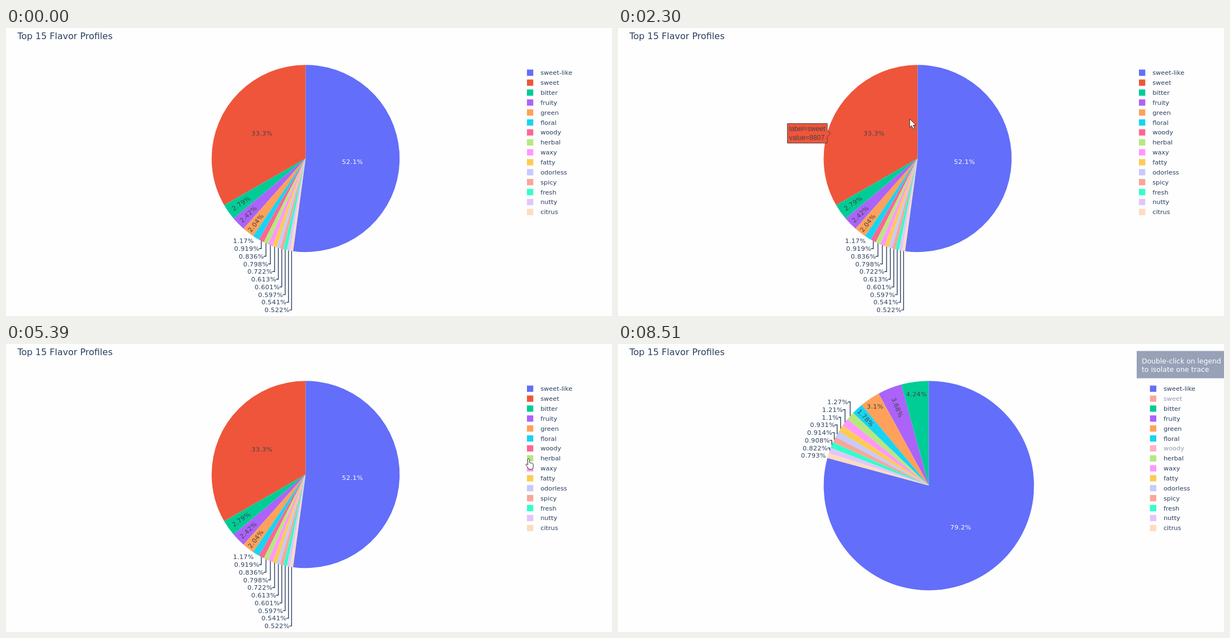
Write an HTML page with a canvas that moves like this. It is 1083 px wide and 517 px high and loops after 9.63 s.

```html
<!DOCTYPE html>
<html lang="en">
<head>
<meta charset="utf-8">
<title>Top 15 Flavor Profiles</title>
<style>
html, body { margin: 0; width: 100%; height: 100%; overflow: hidden; background: #fefefe; }
canvas { display: block; }
</style>
</head>
<body>
<canvas id="stage" width="1083" height="517"></canvas>
<script>
const LOOP = 9630;
const INK = '#2a3f5f';
const SANS = '"DejaVu Sans", Verdana, sans-serif';
const LABEL_FONT = '11.3px ' + SANS;
const LINE_HEIGHT = 13.77;
const HOVER_LAG = 50;
const ctx = document.getElementById('stage').getContext('2d');

const flavors = [
  ['sweet-like', 13785, '#636efa'], ['sweet', 8807, '#ef553b'],
  ['bitter', 738, '#00cc96'], ['fruity', 640, '#ab63fa'],
  ['green', 540, '#ffa15a'], ['floral', 309, '#19d3f3'],
  ['woody', 243, '#ff6692'], ['herbal', 221, '#b6e880'],
  ['waxy', 211, '#ff97ff'], ['fatty', 191, '#fecb52'],
  ['odorless', 162, '#c6cafd'], ['spicy', 159, '#f7a799'],
  ['fresh', 158, '#33ffc9'], ['nutty', 143, '#e0c6fd'],
  ['citrus', 138, '#ffdbc0']
].map(([name, value, color]) => ({ name, value, color }));

// bare: the outside label that needs no leader line
const layouts = [
  { start: 0, cx: 535.5, cy: 234.2, r: 168, legendX: 931, labelY: 382.2, bare: 'floral', hidden: [] },
  { start: 6630, cx: 535.5, cy: 240.2, r: 174, legendX: 933, labelY: 395.7, bare: 'floral', hidden: ['woody'] },
  { start: 8160, cx: 555.5, cy: 254.2, r: 188, legendX: 950.7, labelY: 104, bare: 'citrus', hidden: ['woody', 'sweet'] }
];

// Pointer route: time, x, y
const route = [
  [150, 1005, 520], [420, 705, 386], [680, 705, 386], [1000, 575, 338],
  [1190, 513, 337], [1290, 498, 337], [1450, 462, 318], [1620, 436, 293],
  [1650, 436, 293], [1900, 421, 229], [2100, 447, 172], [2300, 521, 163],
  [2420, 553, 183], [2600, 566, 204], [2630, 566, 204], [3000, 588, 270],
  [3300, 560, 330], [3450, 526, 337], [3560, 505, 335], [3640, 482.5, 323.5],
  [3690, 482, 323], [3800, 478.5, 321], [4550, 478.5, 321], [4910, 864, 238],
  [5180, 864, 238], [5390, 934, 206], [5870, 962.5, 190], [6080, 962.5, 190],
  [6200, 962.5, 188], [6630, 962.5, 188], [7540, 963.5, 98], [8390, 963.5, 98],
  [8510, 998, 450]
];
const clicks = [[4010, 4140], [6200, 6390], [7630, 7780]];

const arrow = new Path2D('M0 0V15.5L3.6 12.2 6.4 18.4 9 17.3 6.3 11.3H11Z');
const hand = new Path2D('M-1.6 1.5a1.6 1.6 0 0 1 3.2 0V7l5 1.2q1.6.5 1.6 2.2V14q0 2-1.4 5H0' +
  'q-1-3-4.6-7.4-1-1.6.4-2.2 1.2-.4 2.6 1.8Z');

function pointerAt(t) {
  const i = route.findIndex(p => p[0] > t);
  if (i < 1) return null;
  const [t0, x0, y0] = route[i - 1], [t1, x1, y1] = route[i];
  const k = (t - t0) / (t1 - t0);
  return { x: x0 + (x1 - x0) * k, y: y0 + (y1 - y0) * k };
}

// Angles run counterclockwise from twelve o'clock; the largest slice comes last.
function buildSlices(layout) {
  const shown = flavors.filter(f => !layout.hidden.includes(f.name));
  const total = shown.reduce((sum, f) => sum + f.value, 0);
  let end = 0;
  return [...shown.slice(1), shown[0]].map(f => {
    const share = f.value / total, start = end, half = Math.PI * share;
    end = start + 2 * half;
    const mid = start + half;
    const inscribed = share > 0.5 ? 0.5 : 1 / (1 + 1 / Math.sin(half));
    const at = k => ({
      x: layout.cx - Math.sin(mid) * layout.r * k,
      y: layout.cy - Math.cos(mid) * layout.r * k
    });
    return { ...f, start, end, mid, half, inscribed, at,
      ink: f.name === 'sweet-like' ? '#fff' : '#444',
      percent: Number((share * 100).toPrecision(3)) + '%' };
  });
}
layouts.forEach(layout => { layout.slices = buildSlices(layout); });

function write(text, x, y, color = INK, align = 'left') {
  ctx.fillStyle = color;
  ctx.textAlign = align;
  ctx.fillText(text, x, y);
}

function drawOutsideLabel(slice, y, withLine) {
  const rim = slice.at(1);
  write(slice.percent, rim.x - 3.6, y + 4.1, INK, 'right');
  if (!withLine) return;
  ctx.beginPath();
  ctx.moveTo(rim.x, rim.y);
  ctx.lineTo(rim.x, y);
  ctx.lineTo(rim.x - 4, y);
  ctx.strokeStyle = INK;
  ctx.lineWidth = 1.4;
  ctx.stroke();
}

function drawPie(layout) {
  const { cx, cy, r, slices } = layout;
  for (const s of slices) {
    ctx.beginPath();
    ctx.moveTo(cx, cy);
    ctx.arc(cx, cy, r, -Math.PI / 2 - s.start, -Math.PI / 2 - s.end, true);
    ctx.fillStyle = s.color;
    ctx.fill();
  }
  ctx.font = LABEL_FONT;
  ctx.letterSpacing = '0.3px';
  let outside = 0;
  for (const s of slices) {
    const width = ctx.measureText(s.percent).width;
    const aspect = width / LINE_HEIGHT;
    if (s.inscribed * r >= Math.hypot(width, LINE_HEIGHT) / 2) {
      const c = s.at(1 - s.inscribed);
      write(s.percent, c.x, c.y + 4.1, s.ink, 'center');
      continue;
    }
    // Largest radial text box that fits between the sides and the rim
    const k = 1 / Math.tan(s.half);
    const reach = Math.hypot(k + 2 * aspect, 1);
    if (r / reach >= LINE_HEIGHT / 2) {
      const c = s.at((k + aspect) / reach);
      ctx.save();
      ctx.translate(c.x, c.y);
      ctx.rotate(Math.PI / 2 - s.mid);
      write(s.percent, 0, 4.1, s.ink, 'center');
      ctx.restore();
    } else {
      drawOutsideLabel(s, layout.labelY + LINE_HEIGHT * outside++, s.name !== layout.bare);
    }
  }
  ctx.letterSpacing = '0px';
}

function drawLegend({ legendX, hidden }) {
  ctx.font = LABEL_FONT;
  flavors.forEach((f, i) => {
    const y = 80.2 + 17.86 * i;
    ctx.globalAlpha = hidden.includes(f.name) ? 0.5 : 1;
    ctx.fillStyle = f.color;
    ctx.fillRect(legendX, y - 5.6, 11.3, 11.3);
    write(f.name, legendX + 24.2, y + 4.1);
  });
  ctx.globalAlpha = 1;
}

function sliceUnder(pointer, { cx, cy, r, slices }) {
  if (!pointer) return null;
  const dx = pointer.x - cx, dy = pointer.y - cy;
  if (Math.hypot(dx, dy) > r) return null;
  const angle = (Math.atan2(-dx, -dy) + 2 * Math.PI) % (2 * Math.PI);
  return slices.find(s => angle < s.end);
}

function drawTooltip(slice, layout) {
  const lines = ['label=' + slice.name, 'value=' + slice.value];
  ctx.font = '12.2px "Liberation Sans", Arial, sans-serif';
  const width = Math.max(...lines.map(line => ctx.measureText(line).width)) + 6.5;
  const side = Math.sin(slice.mid) > 0 ? -1 : 1;
  const c = slice.at(1 - slice.inscribed);
  const tip = c.x + side * slice.inscribed * layout.r;
  const near = tip + side * 5.6, far = near + side * width;
  ctx.beginPath();
  [[tip, 0], [near, -5.6], [near, -17.6], [far, -17.6], [far, 17.6], [near, 17.6], [near, 5.6]]
    .forEach(([x, dy]) => ctx.lineTo(x, c.y + dy));
  ctx.closePath();
  ctx.fillStyle = slice.color;
  ctx.fill();
  ctx.strokeStyle = slice.ink;
  ctx.lineWidth = 1;
  ctx.stroke();
  lines.forEach((line, i) => write(line, Math.min(near, far) + 3, c.y - 3.8 + 16 * i, slice.ink));
}

function drawPointer({ x, y }, clicking) {
  const overLegend = x > 929 && x < 1016 && y > 70 && y < 340;
  const shape = overLegend ? hand : arrow;
  ctx.save();
  ctx.translate(x, y);
  ctx.fillStyle = '#fff';
  ctx.fill(shape);
  ctx.strokeStyle = '#333';
  ctx.lineWidth = 1;
  ctx.stroke(shape);
  if (clicking) {
    ctx.beginPath();
    ctx.arc(0, 0.5, 11.2, 0, 2 * Math.PI);
    ctx.fillStyle = 'rgba(255, 255, 60, 0.75)';
    ctx.fill();
  }
  ctx.restore();
}

function drawNotice(opacity) {
  ctx.globalAlpha = opacity;
  ctx.fillStyle = '#97a1b7';
  ctx.fillRect(927, 12.5, 156, 49);
  ctx.font = '12.4px ' + SANS;
  write('Double-click on legend', 936, 34.5, '#fff');
  write('to isolate one trace', 936, 49.5, '#fff');
  ctx.globalAlpha = 1;
}

function draw(t) {
  const layout = layouts.findLast(l => t >= l.start);
  ctx.fillStyle = '#fefefe';
  ctx.fillRect(0, 0, 1083, 517);
  ctx.font = '16px ' + SANS;
  write('Top 15 Flavor Profiles', 20.5, 19.5);
  drawPie(layout);
  drawLegend(layout);
  if (t > 6630) drawNotice(Math.min(1, (t - 6630) / 700));

  const hovered = sliceUnder(pointerAt(t - HOVER_LAG), layout);
  if (hovered) drawTooltip(hovered, layout);
  const pointer = pointerAt(t);
  if (pointer) drawPointer(pointer, clicks.some(([from, to]) => t >= from && t < to));
}

const began = performance.now();
function tick() {
  draw((performance.now() - began) % LOOP);
  requestAnimationFrame(tick);
}
tick();
</script>
</body>
</html>
```
